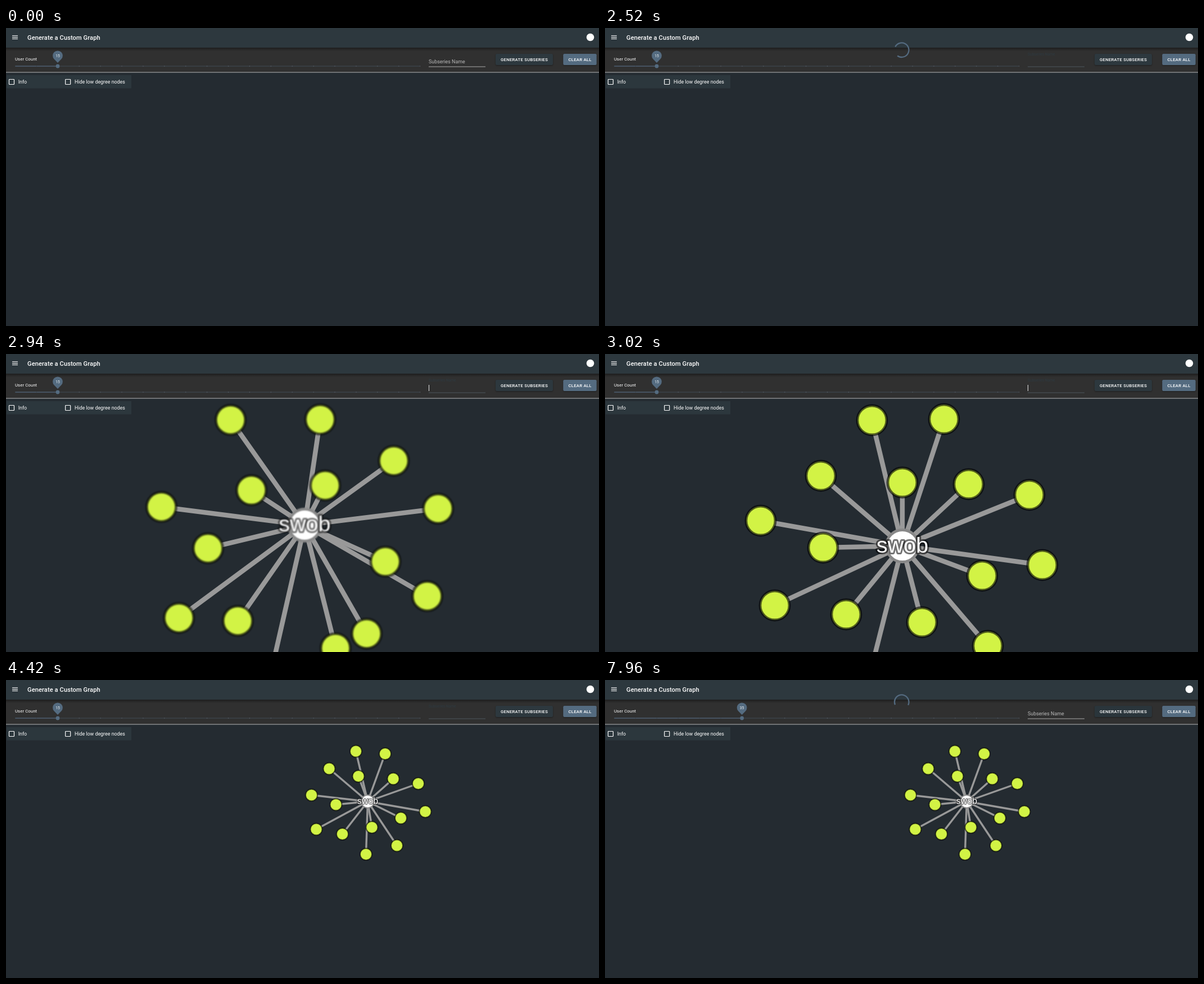
An HTML page with a canvas for the animation above (8000 ms loop, 1055 px wide and 531 px high).

```html
<!DOCTYPE html>
<html lang="en">
<head>
<meta charset="utf-8">
<title>Custom graph</title>
<style>
  html, body { margin: 0; width: 1055px; height: 531px; overflow: hidden; background: #242b31; }
  canvas { display: block; }
</style>
</head>
<body>
<canvas id="stage" width="1055" height="531"></canvas>
<script>
const ctx = document.getElementById('stage').getContext('2d');
const LOOP = 8000, REM = 80 / 9;
const PRIMARY = '#2d383e', SLATE = '#546b80', LIME = '#d2f345';
const LABEL = 'Subseries Name', FIRST = 'swob', SECOND = 'northswob';

// Node offsets from the hub: loose, nearly settled, settled (settled at the small zoom).
const LOOSE = [[-190, -160], [-7, -160], [-57, -15], [64, -39], [189, -118], [246, 17], [195, 196], [145, 74],
  [79, 205], [70, 282], [-60, 282], [-133, 207], [-221, 210], [-257, -23], [-195, 70]];
const CLOSE = [[-54, -224], [74, -226], [-145, -125], [0, -113], [118, -110], [226, -91], [249, 34], [142, 53],
  [152, 178], [35, 136], [-56, 222], [-100, 122], [-227, 106], [-252, -45], [-141, 3]];
const SETTLED = [[-21, -89.5], [31, -85], [-68.5, -58.5], [-16.5, -45], [45.5, -40.5], [90, -32], [102.5, 18],
  [59, 29.5], [52, 78.5], [7.5, 46], [-3, 94], [-45, 58], [-91.5, 49.5], [-100, -11.5], [-56.5, 5.5]];
const SMALL = 0.405;

const clamp = x => Math.max(0, Math.min(1, x));
const ramp = (t, from, length = 200) => clamp((t - from) / length);
const easeOut = x => 1 - (1 - x) ** 3;
const easeInOut = x => x < 0.5 ? 2 * x * x : 1 - 2 * (1 - x) ** 2;
const mix = (a, b, k) => a + (b - a) * k;
const mixPoint = (a, b, k) => [mix(a[0], b[0], k), mix(a[1], b[1], k)];
const within = (t, spans) => spans.some(([from, to]) => t >= from && t < to);

function rect(x, y, w, h, fill, radius = 0) {
  ctx.fillStyle = fill;
  ctx.beginPath();
  ctx.roundRect(x, y, w, h, radius);
  ctx.fill();
}

function disc(x, y, r, fill) {
  ctx.fillStyle = fill;
  ctx.beginPath();
  ctx.arc(x, y, r, 0, 7);
  ctx.fill();
}

function text(str, x, y, size, { fill = '#fff', weight = 400, spacing = 0, align = 'left' } = {}) {
  ctx.font = `${weight} ${size}px Roboto, sans-serif`;
  ctx.letterSpacing = spacing * size + 'px';
  ctx.textAlign = align;
  ctx.fillStyle = fill;
  ctx.fillText(str, x, y);
  ctx.letterSpacing = '0px';
}

function drawHeader() {
  rect(0, 35, 1055, 44, '#303030');
  const shade = ctx.createLinearGradient(0, 35, 0, 41);
  shade.addColorStop(0, 'rgba(0,0,0,.38)');
  shade.addColorStop(1, 'rgba(0,0,0,0)');
  rect(0, 35, 1055, 6, shade);
  rect(0, 0, 1055, 35, PRIMARY);
  rect(0, 78.6, 1055, 1, '#b5b8b9');
  for (const dy of [-2.8, 0, 2.8]) rect(11, 16 + dy, 10, 1.1, '#fff');
  text('Generate a Custom Graph', 38, 20.6, REM * 1.25, { weight: 500, spacing: 0.0075 });
  disc(1039.5, 16.5, 6.8, '#fff');
}

function drawSlider(t) {
  const value = 15 + 5 * Math.round(4 * ramp(t, 6290, 160));
  const step = 37.9, x = 16.2 + (value - 5) / 5 * step, y = 68;
  text('User Count', 16, 57.8, REM * 0.875, { spacing: 0.0107 });
  rect(16, y - 0.55, 720, 1.1, 'rgba(84,107,128,.45)');
  rect(16, y - 0.55, x - 16, 1.1, SLATE);
  for (let i = 0; i < 20; i++) {
    const mark = 16 + i * step;
    rect(mark, y - 0.55, 1.1, 1.1, mark < x ? '#394149' : '#66727a');
  }
  if (within(t, [[6300, 7060]])) disc(x, y, 11, 'rgba(84,107,128,.2)');
  disc(x, y, 3.4, SLATE);
  ctx.beginPath();
  ctx.arc(x, 49.3, 8.9, Math.PI * 0.75, Math.PI * 2.25);
  ctx.lineTo(x, 61.9);
  ctx.fill();
  text(value, x, 51.7, REM * 0.75, { align: 'center', fill: '#eef1f3', spacing: 0.01 });
}

function typed(t) {
  if (t < 1880) return FIRST.slice(0, [1320, 1440, 1560, 1760].filter(at => t >= at).length);
  if (t < 4680 || t >= 7440) return '';
  if (t >= 5600) return SECOND;
  return SECOND.slice(0, 1 + clamp((t - 4740) / 700) * 7);
}

function drawField(t) {
  const x = 752, width = 101;
  const focused = within(t, [[700, 3840], [3900, 6300]]);
  const dip = 0.6 * ramp(t, 3840, 60) * (1 - easeOut(ramp(t, 3900, 160)));
  const focus = easeOut(ramp(t, 720)) * (1 - easeOut(ramp(t, 6280, 180))) - dip;
  const shrink = easeOut(ramp(t, 720)) * (1 - easeOut(ramp(t, 7440))) - dip;

  text(LABEL, x, mix(63.4, 49, shrink), REM * mix(1, 0.75, shrink), { fill: focused ? '#2e3a41' : '#b9b9b9' });

  const hover = within(t, [[440, 720], [7040, 7080]]) ? ramp(t, t < 1000 ? 420 : 7000, 100) : 0;
  rect(x, 68.5, width, 0.9 + hover * 0.5, hover ? '#e0e0e0' : '#a9a9a9');
  if (focus > 0) rect(x + width * (1 - focus) / 2, 68.2, width * focus, 1.6, '#2f363a');

  const value = typed(t);
  text(value, x, 63.4, REM);
  if (within(t, [[720, 1240], [1320, 2380], [2880, 3440], [3920, 4420], [4680, 6020]]))
    rect(Math.round(x + ctx.measureText(value).width), 55, 1, 11, '#e8e8e8');
}

function button(label, x, width, fill) {
  ctx.shadowColor = 'rgba(0,0,0,.4)';
  ctx.shadowBlur = 2.5;
  ctx.shadowOffsetY = 1;
  rect(x, 46, width, 20, fill, 2.2);
  ctx.shadowColor = 'transparent';
  text(label, x + width / 2 + 0.1, 58.9, REM * 0.875, { weight: 500, spacing: 0.02857, align: 'center' });
}

function drawButtons(t) {
  button('GENERATE SUBSERIES', 871, 102, t >= 7280 ? '#2a353b' : PRIMARY);
  button('CLEAR ALL', 991.3, 59.4, SLATE);
  const ripple = ramp(t, 7440, 460);
  if (ripple > 0 && ripple < 1) {
    ctx.save();
    ctx.beginPath();
    ctx.roundRect(871, 46, 102, 20, 2.2);
    ctx.clip();
    disc(918, 57, 50 * easeOut(ripple), `rgba(255,255,255,${0.12 * (1 - ripple)})`);
    ctx.restore();
  }
}

function drawSpinner(t) {
  const start = t < 4000 ? 1880 : 7480;
  if (t < start || within(t, [[2600, 7480]])) return;
  const turn = (t - start) / 1400 % 1, unit = 1 / 20.2;
  const grow = easeInOut(clamp(turn * 2)), chase = easeInOut(clamp(turn * 2 - 1));
  const offset = 15 * grow + 110 * chase;
  const length = Math.min(1 + 99 * grow, 126.9 - offset);
  const angle = turn * 2 * Math.PI + offset * unit;
  ctx.strokeStyle = SLATE;
  ctx.lineWidth = 2.27;
  ctx.beginPath();
  ctx.arc(527.8, 39.2, 12.75, angle, angle + length * unit);
  ctx.stroke();
}

function graphPose(t) {
  if (t < 2880) {
    const spread = 0.3 + 0.7 * easeOut(ramp(t, 2620, 260));
    return { hub: [533, 277], zoom: 1, nodes: LOOSE.map(([x, y]) => [x * spread, y * spread]) };
  }
  if (t < 3060) {
    const k = ramp(t, 2880, 140);
    return { hub: mixPoint([533, 277], [529, 342], k), zoom: 1, nodes: LOOSE.map((p, i) => mixPoint(p, CLOSE[i], k)) };
  }
  const k = t < 3520 ? 0 : t < 3620 ? 0.5 : 1;
  const zoom = mix(1, SMALL, k), scale = zoom / SMALL;
  return { hub: mixPoint([527, 342], [643.5, 216.5], k), zoom, nodes: SETTLED.map(([x, y]) => [x * scale, y * scale]) };
}

function drawGraph(t) {
  if (t < 2640) return;
  const { hub, zoom, nodes } = graphPose(t);
  ctx.save();
  ctx.translate(...hub);
  ctx.strokeStyle = '#999';
  ctx.lineWidth = 8.5 * zoom;
  for (const [x, y] of nodes) {
    ctx.beginPath();
    ctx.moveTo(0, 0);
    ctx.lineTo(x, y);
    ctx.stroke();
  }
  if (t < 3000) ctx.filter = 'blur(0.8px)';

  const node = (x, y, r, fill, border) => {
    disc(x, y, r * zoom, fill);
    ctx.strokeStyle = border;
    ctx.lineWidth = 4.8 * zoom;
    ctx.stroke();
  };
  node(0, 0, 28.5, '#fff', '#888');
  ctx.font = `${39.5 * zoom}px "Liberation Sans", Arial, sans-serif`;
  ctx.textAlign = 'center';
  ctx.lineJoin = 'round';
  ctx.strokeStyle = 'rgba(0,0,0,.55)';
  ctx.lineWidth = 6 * zoom;
  ctx.strokeText(FIRST, 0, 11.5 * zoom);
  ctx.fillStyle = '#fff';
  ctx.fillText(FIRST, 0, 11.5 * zoom);
  for (const [x, y] of nodes) node(x, y, 26, LIME, 'rgba(0,0,0,.6)');
  ctx.restore();
}

function drawOptions() {
  rect(1, 84, 222, 23.5, '#2c373d');
  for (const [label, x] of [['Info', 10], ['Hide low degree nodes', 110.2]]) {
    ctx.strokeStyle = '#fff';
    ctx.lineWidth = 1.2;
    ctx.beginPath();
    ctx.roundRect(x - 4.5, 91.5, 9, 9, 0.8);
    ctx.stroke();
    text(label, x + 11.7, 99.2, REM);
  }
}

function draw(now) {
  const t = Math.floor(now % LOOP / 20) * 20;
  rect(0, 0, 1055, 531, '#242b31');
  drawGraph(t);
  drawHeader();
  drawSlider(t);
  drawField(t);
  drawButtons(t);
  drawSpinner(t);
  drawOptions();
}

const begin = performance.now();
(function tick() {
  draw(performance.now() - begin);
  requestAnimationFrame(tick);
})();
</script>
</body>
</html>
```
